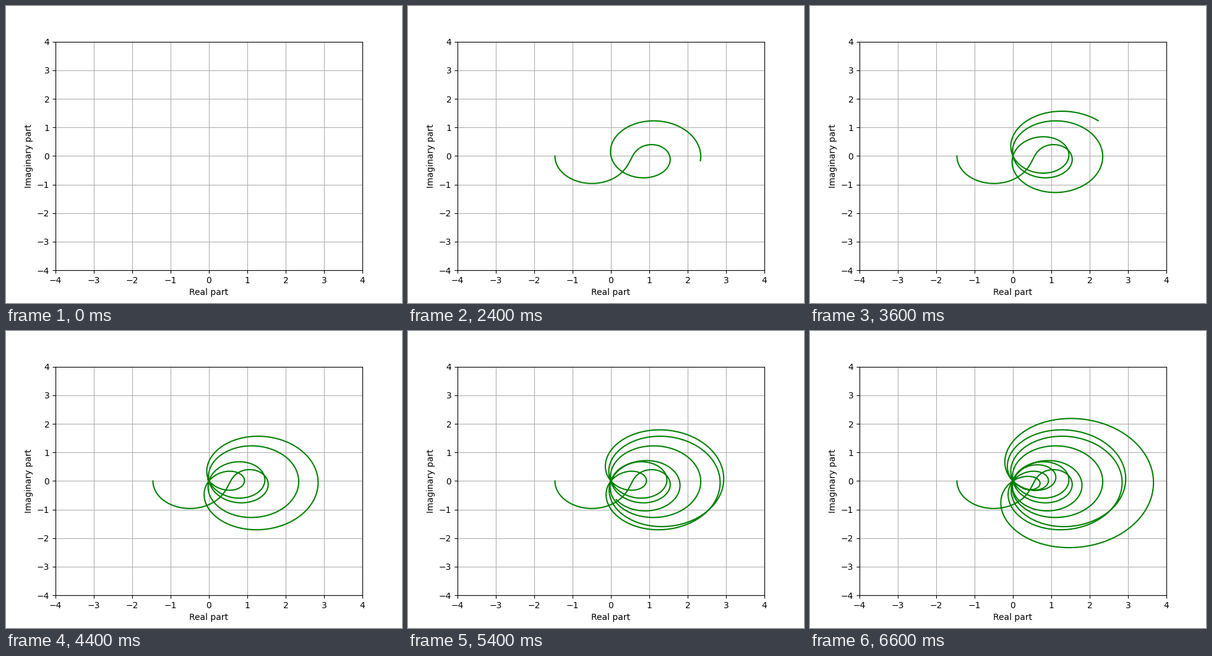
Write a matplotlib script that moves like this. It is 640 px wide and 480 px high and loops after 6.8 s.

```python
import numpy as np
import matplotlib.pyplot as plt
from matplotlib.animation import FuncAnimation

FRAMES = 34
INTERVAL = 200      # ms
T_STEP = 1.5        # growth of t per frame
SAMPLES = 75        # curve points per frame


def zeta(s, cut=100):
    """Riemann zeta by Euler-Maclaurin summation."""
    n = np.arange(1, cut)
    total = np.exp(-np.outer(s, np.log(n))).sum(axis=1)
    tail = np.exp(-s * np.log(cut))
    total += tail * (cut / (s - 1) + 0.5 + s / (12 * cut))
    total -= tail * s * (s + 1) * (s + 2) / (720 * cut**3)
    return total


t = np.arange(FRAMES * SAMPLES) * T_STEP / SAMPLES
curve = zeta(0.5 + 1j * t)

fig, ax = plt.subplots(figsize=(6.4, 4.8), dpi=100)
ax.set(xlim=(-4, 4), ylim=(-4, 4), xlabel="Real part", ylabel="Imaginary part")
ax.grid(True)
line, = ax.plot([], [], color="green", lw=1.5)


def update(i):
    part = curve[:i * SAMPLES]
    line.set_data(part.real, part.imag)
    return line,


anim = FuncAnimation(fig, update, frames=FRAMES, interval=INTERVAL,
                     repeat=True, repeat_delay=0)
plt.show()
```
